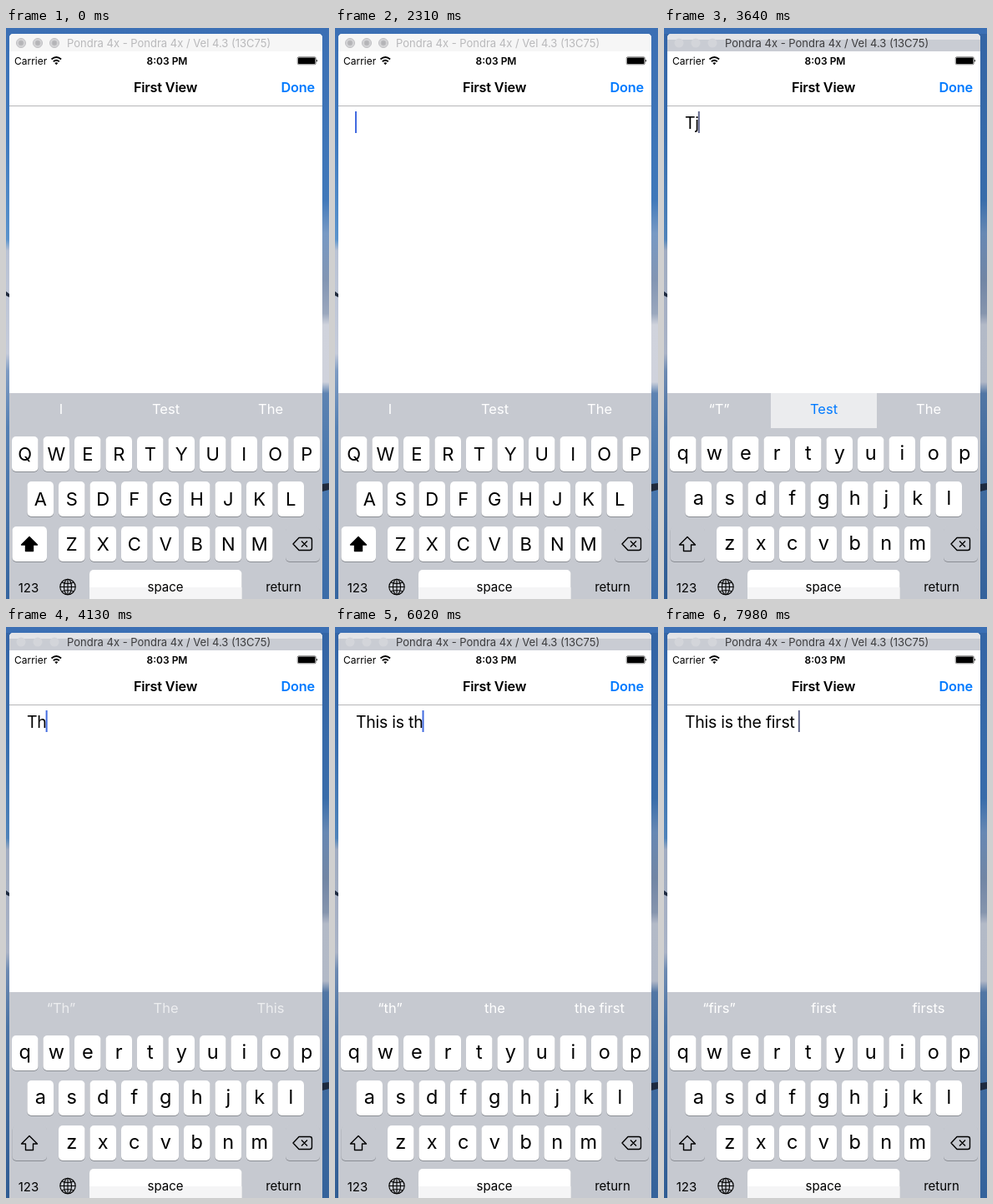
An HTML page for the animation above (8000 ms loop, 387 px wide and 685 px high).

```html
<!DOCTYPE html>
<html lang="en">
<head>
<meta charset="utf-8">
<title>Typing with suggestions</title>
<style>
html, body { margin: 0; width: 100%; height: 100%; overflow: hidden; }
svg { display: block; width: 387px; height: 685px; font-family: Inter, "Open Sans", sans-serif; }
text { white-space: pre; }
.mid { text-anchor: middle; }
.nav { font-size: 16.3px; font-weight: 600; letter-spacing: -.2px; }
.small { font-size: 12px; }
.label { font-size: 15px; }
.tip { font-size: 16.5px; }
</style>
</head>
<body>
<svg viewBox="0 0 387 685">
  <defs>
    <linearGradient id="left" x1="0" y1="0" x2="0" y2="1">
      <stop offset="0" stop-color="#3b6fb4"/><stop offset=".2" stop-color="#3f7abf"/>
      <stop offset=".37" stop-color="#5a93cc"/><stop offset=".39" stop-color="#b9c2d4"/>
      <stop offset=".57" stop-color="#c5cbda"/><stop offset=".6" stop-color="#7f9cc3"/>
      <stop offset=".7" stop-color="#5580b3"/><stop offset="1" stop-color="#35659f"/>
    </linearGradient>
    <linearGradient id="right" x1="0" y1="0" x2="0" y2="1">
      <stop offset="0" stop-color="#3b6fb4"/><stop offset=".3" stop-color="#3f78ba"/>
      <stop offset=".36" stop-color="#7799c4"/><stop offset=".44" stop-color="#8295b3"/>
      <stop offset=".5" stop-color="#9aa7bd"/><stop offset=".52" stop-color="#d0d3dc"/>
      <stop offset=".62" stop-color="#cfd2dc"/><stop offset=".64" stop-color="#5d83b2"/>
      <stop offset=".75" stop-color="#4c79ae"/><stop offset="1" stop-color="#3b6ca8"/>
    </linearGradient>
  </defs>
  <rect width="200" height="685" fill="url(#left)"/>
  <rect x="200" width="187" height="685" fill="url(#right)"/>
  <path d="M0 316l4 3v4l-4-2zM379 547l8-1v8l-8 2z" fill="#202a3c"/>
  <rect id="shade" y="7" width="387" height="678" fill="#102a55" opacity=".15"/>

  <path d="M4 685V12q0-5 5-5h365q5 0 5 5v673z" fill="#fff"/>
  <path id="bar" d="M4 28V12q0-5 5-5h365q5 0 5 5v16z"/>
  <rect id="band" x="4" y="14" width="375" height="14" fill="#c9ccd3"/>
  <g id="lights"></g>
  <text id="title" x="73" y="23" font-size="13">Pondra 4x - Pondra 4x / Vel 4.3 (13C75)</text>

  <text class="small" x="10" y="44">Carrier</text>
  <path d="M54.5 37.5q5.800-5 11.600 0M56.800 40.200q3.500-3 7 0" fill="none" stroke="#000" stroke-width="1.800"/>
  <path d="M58.300 42q2-1.700 4 0l-2 2.200z"/>
  <text class="small mid" x="193" y="44" font-weight="600">8:03 PM</text>
  <rect x="349.250" y="34.750" width="22" height="9" rx="1.500" fill="none" stroke="#000" stroke-width=".5"/>
  <rect x="350" y="35.500" width="20.500" height="7.500" rx=".8"/>
  <path d="M372 37.700q2 1.500 0 3z"/>
  <text class="nav mid" x="191" y="77">First View</text>
  <text class="nav" x="329.500" y="77" fill="#007aff">Done</text>
  <rect x="4" y="93" width="375" height="1" fill="#b6b6b8"/>

  <text id="typed" x="25" y="121" font-size="19.500" letter-spacing="-.25"></text>
  <rect id="caret" y="100" width="2" height="26"/>

  <rect x="4" y="438" width="375" height="247" fill="#c6c9d0"/>
  <rect id="pick" x="128" y="438" width="127" height="42" fill="#ebecee"/>
  <g id="tips"></g>
  <g id="keys"></g>
  <path id="shift" d="M28 610.500L37.500 620H32.500V627.500H23.500V620H18.500Z" stroke="#000" stroke-width="1.400" stroke-linejoin="round"/>
  <g fill="none" stroke="#000" stroke-width="1.400" stroke-linejoin="round">
    <path d="M344 619l7-7.500h13q2.500 0 2.500 2.500v10q0 2.500-2.500 2.500h-13zM354 615.500l7 7m0-7l-7 7"/>
    <g stroke-width="1.100">
      <circle cx="74" cy="670.500" r="9.200"/>
      <ellipse cx="74" cy="670.500" rx="4.500" ry="9.200"/>
      <path d="M74 661v19M64.800 670.500h18.400M67 665q7 3 14 0M67 676q7-3 14 0"/>
    </g>
  </g>
  <text class="label mid" x="27" y="677">123</text>
  <text class="label mid" x="191" y="676">space</text>
  <text class="label mid" x="332.500" y="676">return</text>
</svg>
<script>
const LOOP = 8000, FOCUS = 2380, LOWER = 2940;
const NS = "http://www.w3.org/2000/svg";
const $ = id => document.getElementById(id);

function add(parent, tag, attrs, text = "") {
  const el = document.createElementNS(NS, tag);
  for (const k in attrs) el.setAttribute(k, attrs[k]);
  el.textContent = text;
  return parent.appendChild(el);
}

function addKey(x, y, w, fill) {
  const box = { x, width: w, height: 42, rx: 5 };
  add($("keys"), "rect", { ...box, y: y + 1, fill: "#8a8d93" });
  return add($("keys"), "rect", { ...box, y, fill });
}

const letters = [];
[["QWERTYUIOP", 7, 490], ["ASDFGHJKL", 25.5, 544], ["ZXCVBNM", 63, 598]].forEach(([row, x0, y]) =>
  [...row].forEach((ch, i) => {
    const x = x0 + i * 37.5;
    addKey(x, y, 31.5, "#fff");
    letters.push({ ch, y, el: add($("keys"), "text", { class: "mid", x: x + 15.75 }) });
  }));
const shiftKey = addKey(7.5, 598, 41.5, "#fff");
addKey(335, 598, 41, "#c6c9d0");
addKey(100, 650, 182.5, "#fff");
add($("keys"), "rect", { x: 100, y: 671, width: 182.5, height: 14, fill: "#f5f5f6" });

for (const cx of [18, 38, 58]) {
  add($("lights"), "circle", { cx, cy: 18, r: 5.5 });
  add($("lights"), "circle", { cx, cy: 18, r: 3, class: "dot", fill: "#b4b4b7" });
}
const tips = [66, 191.5, 317].map(x => add($("tips"), "text", { class: "tip mid", x, y: 463 }));

// [time, text]
const typing = [
  [0, ""], [2870, "T"], [3500, "Tj"], [3710, "T"], [3920, "Th"], [4200, "Thi"],
  [4550, "This"], [4690, "This "], [5110, "This i"], [5320, "This is"],
  [5530, "This is "], [5740, "This is t"], [5950, "This is th"], [6160, "This is the"],
  [6370, "This is the "], [6790, "This is the f"], [7000, "This is the fi"],
  [7210, "This is the fir"], [7420, "This is the firs"], [7630, "This is the first"],
  [7770, "This is the first "]
];
// [time, left, middle, right]
const hints = [
  [0, "I", "Test", "The"], [3080, "“T”", "Test", "The"], [4060, "“Th”", "The", "This"],
  [5810, "“th”", "the", "the first"], [6440, "first", "best", "only"],
  [7560, "“firs”", "first", "firsts"]
];
const at = (list, t) => list.filter(e => e[0] <= t).pop();
const clamp = v => Math.max(0, Math.min(1, v));

function caretAlpha(t) {
  if (t >= 2240) return clamp((t - 2170) / 140);
  const p = (t + 910) % 1050;
  return t < 140 ? 0 : Math.min(clamp((p + 70) / 140), clamp((770 - p) / 210));
}

let upperNow = null;
function setCase(upper) {
  if (upper === upperNow) return;
  upperNow = upper;
  for (const { ch, y, el } of letters) {
    el.textContent = upper ? ch : ch.toLowerCase();
    el.setAttribute("font-size", upper ? 22 : 23.5);
    el.setAttribute("y", y + (upper ? 29 : 28));
  }
  shiftKey.setAttribute("fill", upper ? "#fff" : "#c6c9d0");
  $("shift").setAttribute("fill", upper ? "#000" : "none");
}

function draw(t) {
  const focus = t >= FOCUS;
  $("shade").style.display = $("band").style.display = focus ? "" : "none";
  $("bar").setAttribute("fill", focus ? "#e3e4e7" : "#f6f6f6");
  $("title").setAttribute("fill", focus ? "#3c3c3e" : "#b9b9bb");
  $("lights").setAttribute("fill", focus ? "#d3d5da" : "#d6d6d8");
  $("lights").setAttribute("stroke", focus ? "none" : "#bfbfc2");
  document.querySelectorAll(".dot").forEach(d => d.style.display = focus ? "none" : "");
  setCase(t < LOWER);

  const typed = $("typed"), caret = $("caret");
  typed.textContent = at(typing, t)[1];
  caret.setAttribute("x", 24 + typed.getComputedTextLength());
  const dim = t >= 7980 || (t >= 3570 && t < 3710);
  caret.setAttribute("fill", dim ? "#62688c" : "#426be0");
  caret.setAttribute("opacity", caretAlpha(t));

  const [start, ...words] = at(hints, t);
  const picked = t >= 3220 && t < 3850;
  $("pick").style.display = picked ? "" : "none";
  tips.forEach((el, i) => {
    el.textContent = words[i];
    el.setAttribute("fill", picked && i === 1 ? "#007aff" : "#fff");
    el.setAttribute("opacity", start ? clamp((t - start + 70) / 210) : 1);
  });
}

function tick() {
  draw(performance.now() % LOOP);
  requestAnimationFrame(tick);
}
tick();
</script>
</body>
</html>
```
